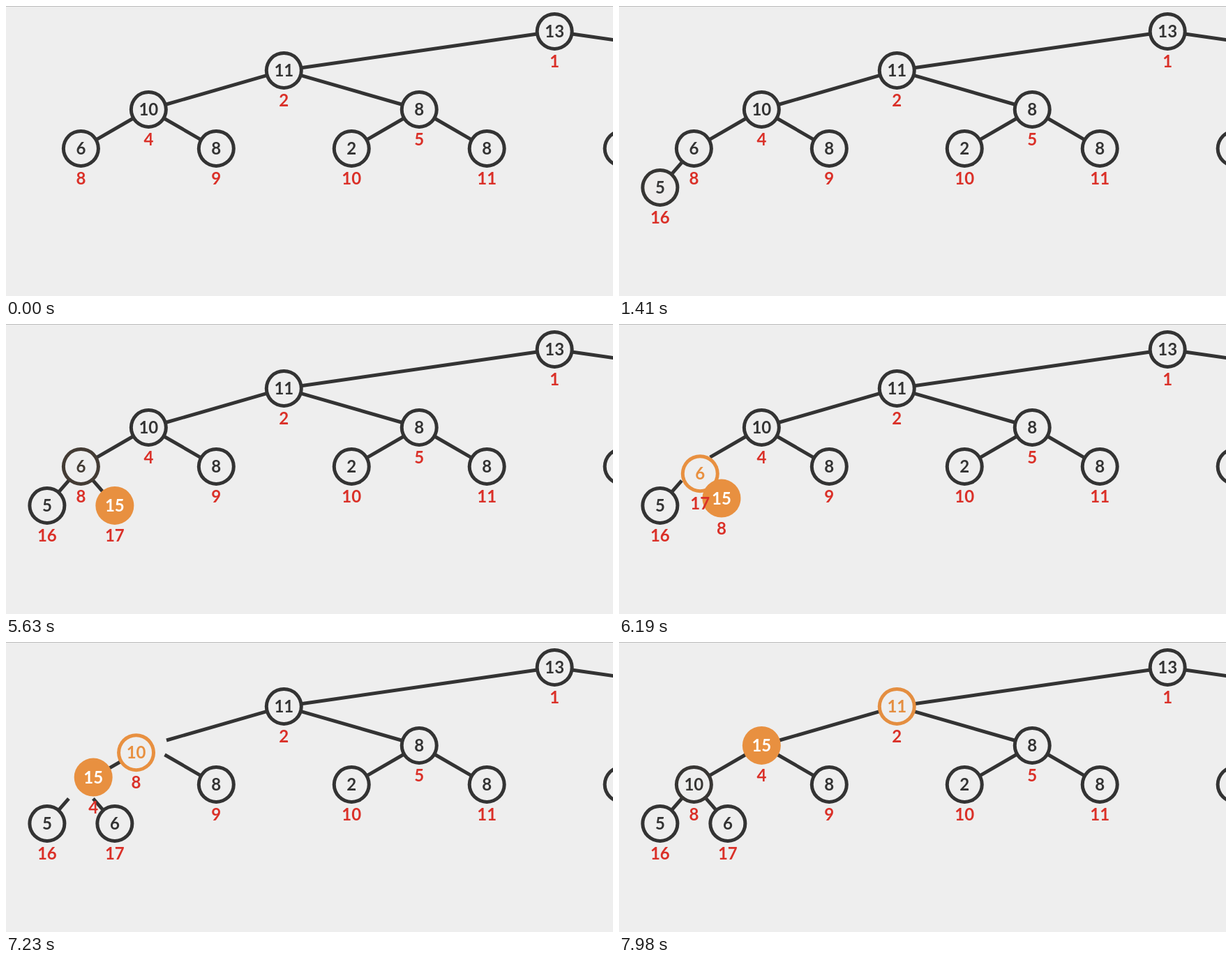
Recreate the animation shown at these times as an HTML page. Size 870 by 416 pixels, loop 8 s.

```html
<!DOCTYPE html>
<html lang="en">
<head>
<meta charset="utf-8">
<title>Heap insert</title>
<style>
  html, body { margin: 0; width: 100%; height: 100%; overflow: hidden; background: #eee; }
  svg { display: block; width: 870px; height: 416px; }
  text { font: 700 24px Lato, "Noto Sans CJK JP", "Open Sans", sans-serif; text-anchor: middle; }
  .edge { stroke: #333; stroke-width: 5; }
  .label { fill: #da3028; }
</style>
</head>
<body>
<svg viewBox="0 0 870 416">
  <rect width="870" height="1" fill="#bcbcbc"/>
  <g id="edges"></g>
  <g id="discs"></g>
  <g id="texts"></g>
</svg>
<script>
const LOOP = 8000, DURATION = 500;
const DARK = [51, 51, 51], PAPER = [238, 238, 238], ORANGE = [232, 144, 64], WHITE = [255, 255, 255];
const RADIUS = 27.5, RING = 5, GAP = 26.7, SIZE = 24;

// Start times of the transitions
const ADD_5 = 472, SETTLE_5 = 992, ADD_15 = 4972, COMPARE_6 = 5492,
      SWAP_6 = 6012, COMPARE_10 = 6532, SWAP_10 = 7052, COMPARE_11 = 7572;

// heat: [on, off] times of the orange state; moves: [time, new slot]
const nodes = [
  { slot: 1, value: 13 },
  { slot: 2, value: 11, heat: [COMPARE_11] },
  { slot: 4, value: 10, heat: [COMPARE_10, COMPARE_11], moves: [[SWAP_10, 8]] },
  { slot: 5, value: 8 },
  { slot: 8, value: 6, heat: [COMPARE_6, COMPARE_10], moves: [[SWAP_6, 17]] },
  { slot: 9, value: 8 },
  { slot: 10, value: 2 },
  { slot: 11, value: 8 },
  { slot: 12, value: '' },
  { slot: 16, value: 5, born: ADD_5, heat: [ADD_5, SETTLE_5], solid: true },
  { slot: 17, value: 15, born: ADD_15, heat: [ADD_15], solid: true, moves: [[SWAP_6, 8], [SWAP_10, 4]] }
];
const edges = [2, 3, 4, 5, 8, 9, 10, 11, 16, 17].map(child => ({
  child, born: { 16: ADD_5, 17: ADD_15 }[child]
}));

function add(parent, tag, className) {
  const el = document.createElementNS('http://www.w3.org/2000/svg', tag);
  if (className) el.setAttribute('class', className);
  return document.getElementById(parent).appendChild(el);
}
function set(el, attrs) {
  for (const key in attrs) el.setAttribute(key, attrs[key]);
}
const lerp = (a, b, p) => a + (b - a) * p;
const mix = (a, b, p) => `rgb(${a.map((v, i) => Math.round(lerp(v, b[i], p)))})`;

// Cubic in-out progress of a transition; without a start time it is complete
function progress(t, start) {
  if (start === undefined) return 1;
  const u = Math.min(1, Math.max(0, (t - start) / DURATION));
  return u < 0.5 ? 4 * u ** 3 : 1 - 4 * (1 - u) ** 3;
}

function spot(slot) {
  const depth = Math.floor(Math.log2(slot)), count = 2 ** depth;
  return { x: 10.4 + 1551.6 * (slot - count + 0.5) / count, y: 36.4 + 56 * depth };
}

function place(node, t) {
  let { slot } = node, { x, y } = spot(slot);
  for (const [start, next] of node.moves || []) {
    if (t < start) break;
    const p = progress(t, start), to = spot(next);
    x = lerp(x, to.x, p);
    y = lerp(y, to.y, p);
    slot = next;
  }
  return { x, y, slot };
}

function drawEdge({ el, child, born }, t) {
  const a = spot(child >> 1), b = spot(child);
  const length = Math.hypot(b.x - a.x, b.y - a.y), near = GAP / length;
  const p = progress(t, born), far = lerp(near, 1 - near, p);
  set(el, {
    x1: lerp(a.x, b.x, near), y1: lerp(a.y, b.y, near),
    x2: lerp(a.x, b.x, far), y2: lerp(a.y, b.y, far),
    visibility: p ? 'visible' : 'hidden'
  });
}

function drawNode(node, t) {
  const { x, y, slot } = place(node, t), grow = progress(t, node.born);
  const [on, off] = node.heat || [];
  let heat = on === undefined ? 0 : progress(t, on);
  if (off !== undefined) heat -= progress(t, off);

  set(node.outer, { cx: x, cy: y, r: RADIUS * grow, fill: mix(DARK, ORANGE, heat) });
  set(node.inner, {
    cx: x, cy: y, r: (RADIUS - RING) * grow,
    fill: mix(PAPER, ORANGE, node.solid ? heat : 0)
  });
  const visibility = grow > 0.002 ? 'visible' : 'hidden';
  const style = `font-size:${SIZE * grow}px`;
  set(node.text, { x, y: y + 8.6, style, visibility, fill: mix(DARK, node.solid ? WHITE : ORANGE, heat) });
  set(node.label, { x, y: y + 51.7, style, visibility });
  const name = node.value === '' ? '' : String(slot);
  if (node.label.textContent !== name) node.label.textContent = name;
}

for (const edge of edges) edge.el = add('edges', 'line', 'edge');
for (const node of nodes) {
  node.outer = add('discs', 'circle');
  node.inner = add('discs', 'circle');
  node.text = add('texts', 'text');
  node.label = add('texts', 'text', 'label');
  node.text.textContent = node.value;
}

function frame() {
  const t = performance.now() % LOOP;
  for (const edge of edges) drawEdge(edge, t);
  for (const node of nodes) drawNode(node, t);
  requestAnimationFrame(frame);
}
frame();
</script>
</body>
</html>
```
